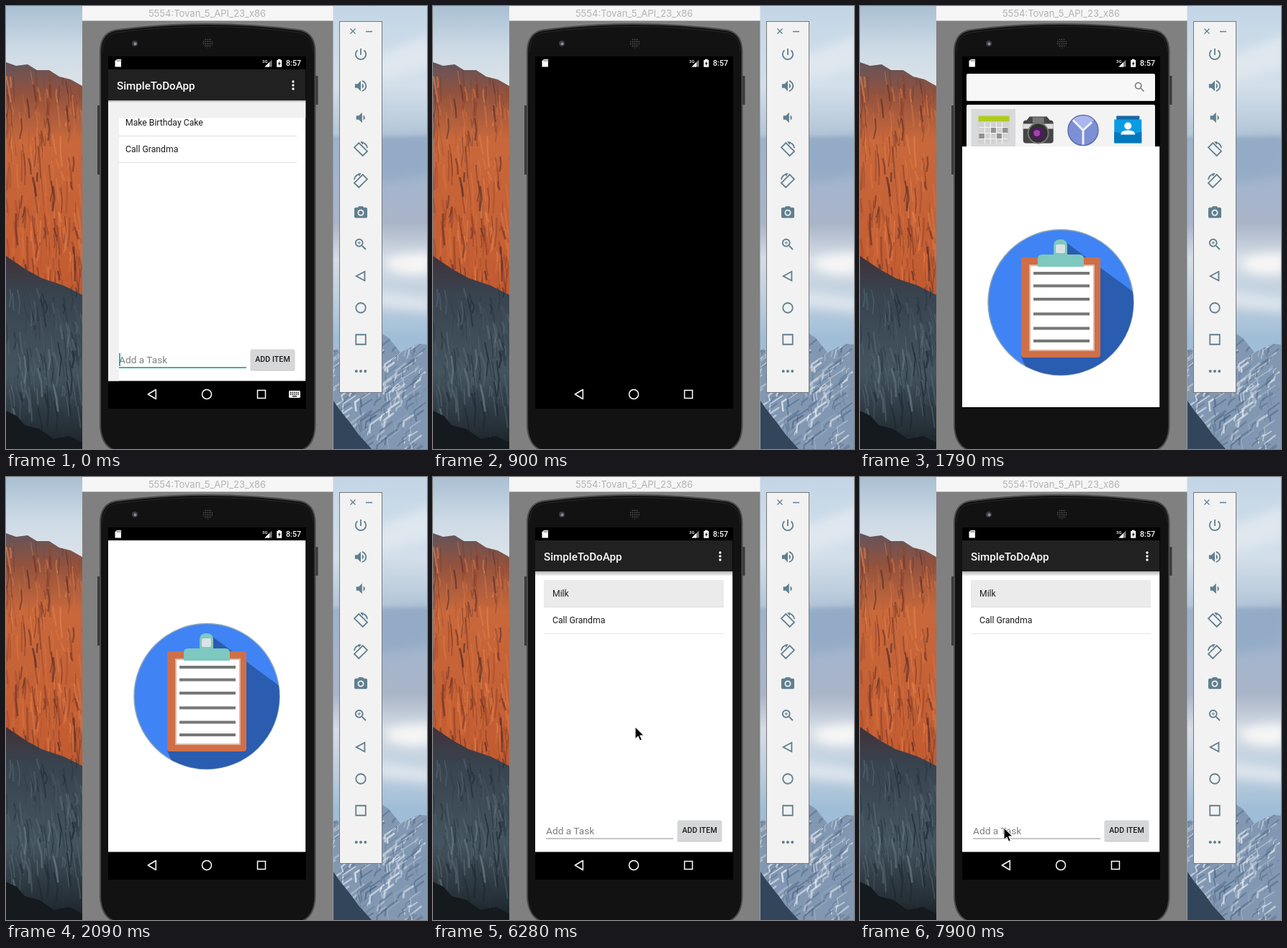
Recreate the animation shown at these times as an HTML page. Size 585 by 615 pixels, loop 8 s.

```html
<!DOCTYPE html>
<html lang="en">
<head>
<meta charset="utf-8">
<title>To-do app in the emulator</title>
<style>
html, body { margin: 0; width: 100%; height: 100%; overflow: hidden; background: #808080; }
svg { display: block; }
text { font-family: Roboto, sans-serif; }
.medium { font-weight: 500; }
.line { fill: none; }
</style>
</head>
<body>
<svg width="585" height="615" viewBox="0 0 585 615">
  <defs>
    <linearGradient id="sky" x2="0" y2="1">
      <stop offset="0" stop-color="#c3d6e6"/><stop offset=".18" stop-color="#d3dfea"/>
      <stop offset=".29" stop-color="#b3c6d8"/><stop offset=".3" stop-color="#9db2ca"/>
      <stop offset=".4" stop-color="#a4b5cd"/><stop offset=".49" stop-color="#a9b4c8"/>
      <stop offset=".57" stop-color="#d5dde6"/><stop offset=".67" stop-color="#bccddd"/>
      <stop offset=".75" stop-color="#9fbdd7"/>
    </linearGradient>
    <linearGradient id="leftSky" x2="0" y2="1">
      <stop offset="0" stop-color="#a9bfd3"/><stop offset=".5" stop-color="#cddae5"/><stop offset="1" stop-color="#dfe5ea"/>
    </linearGradient>
    <linearGradient id="cliff" x2="0" y2="1">
      <stop offset="0" stop-color="#62545a"/><stop offset=".08" stop-color="#92523e"/>
      <stop offset=".2" stop-color="#c8683b"/><stop offset=".6" stop-color="#c25a30"/><stop offset="1" stop-color="#8d3d29"/>
    </linearGradient>
    <linearGradient id="shade" x2="0" y2="1">
      <stop offset="0" stop-color="#40323a"/><stop offset=".2" stop-color="#38444f"/>
      <stop offset=".6" stop-color="#44545f"/><stop offset="1" stop-color="#1a2228"/>
    </linearGradient>
    <linearGradient id="barShadow" x2="0" y2="1">
      <stop offset="0" stop-opacity=".3"/><stop offset="1" stop-opacity="0"/>
    </linearGradient>
    <filter id="soft"><feGaussianBlur stdDeviation="7"/></filter>
    <filter id="blur"><feGaussianBlur stdDeviation=".7"/></filter>
    <pattern id="mesh" width="3" height="3" patternUnits="userSpaceOnUse">
      <rect width="3" height="3" fill="#161616"/><circle cx="1.5" cy="1.5" r=".8" fill="#5a5a5a"/>
    </pattern>
    <clipPath id="screen"><path d="M142 88h274.5v469H142z"/></clipPath>
    <clipPath id="disc"><circle cx="279" cy="304.5" r="101"/></clipPath>
    <clipPath id="rock"><path id="rockShape" d="M0 78l14 5 16-2 13 8 17 0 14 9 16 4 16 9V615H0z"/></clipPath>
    <clipPath id="snow"><path id="snowShape" d="M455 478l20-8 30-12 18-3 9 6 16 20 14-7 12-5 11 1V615H455z"/></clipPath>
    <g id="badge">
      <circle cx="279" cy="304.5" r="101" fill="#4083f4" stroke="#8da7b5" stroke-width="1.5"/>
      <path d="M286 221L400 305V420H240L224 379z" fill="#2a5caf" clip-path="url(#disc)"/>
      <rect x="224" y="242" width="110" height="139" rx="4" fill="#cf6f48"/>
      <rect x="236" y="253" width="89" height="118" fill="#fff" stroke="#e3b5a2" stroke-width="2"/>
      <path d="M241 264h78M241 281.5h78M241 300h78M241 320.5h78M241 340.5h78M241 358h78" stroke="#777" stroke-width="4" filter="url(#blur)"/>
      <path d="M247 255v-11q0-6 6-6h16v-12q0-9 9.500-9t9.500 9v12h17q6 0 6 6v11z" fill="#7ec8bf"/>
      <rect x="272" y="224" width="13" height="12" rx="2" fill="#d9e2e4"/>
    </g>
  </defs>

  <!-- Wallpaper -->
  <path d="M0 0h585v615H0z" fill="url(#sky)"/>
  <path d="M0 0h106v120H0z" fill="url(#leftSky)"/>
  <g filter="url(#soft)">
    <path d="M515 70l75-30v45l-75 20z" fill="#e4ebf1" opacity=".8"/>
    <path d="M515 185l75-6v55l-75 12z" fill="#8ba5c4" opacity=".6"/>
    <path d="M530 352q25-10 60-8v26q-30 8-60-6z" fill="#f6f6f5"/>
    <path d="M515 395l75 10v20l-75-8z" fill="#dde5ed"/>
  </g>
  <use href="#rockShape" fill="url(#cliff)"/>
  <g id="cliffStreaks" clip-path="url(#rock)"></g>
  <path d="M0 347L28 366 50 378 80 388 106 401V615H0z" fill="url(#shade)"/>
  <g id="shadeStreaks"></g>
  <path d="M0 562l15 7 11 13 20 5 20 14 22-4 18 9v9H0z" fill="#141a1d"/>
  <use href="#snowShape" fill="#8298b2"/>
  <g id="snowStreaks" clip-path="url(#snow)"></g>
  <path d="M455 548l9 13 16 20 10 14 18 20h-53z" fill="#33455a"/>

  <!-- Emulator window -->
  <path d="M106 20h348.500v595H106z" fill="#808080"/>
  <path d="M106 0h348.500v20.500H106z" fill="#f6f6f6"/>
  <text x="279.500" y="15" text-anchor="middle" font-size="13" fill="#b3b3b3" style="font-family:Inter,sans-serif">5554:Tovan_5_API_23_x86</text>
  <path d="M127 138h4v96h-4zM430 97h3.500v40H430z" fill="#3a3a3a"/>
  <path d="M131 64Q131 38 152 33.500Q280 16.500 409 33.500Q429.500 38 429.500 64V582Q429 612 407 618H154Q132 612 131 582z" fill="#121212" stroke="#4a4a4a" stroke-width="2"/>
  <path d="M134 64Q134 41 153 37Q280 20 408 37Q427 41 427 64" class="line" stroke="#252525"/>
  <circle cx="179" cy="52" r="4" fill="#3c3c42"/><circle cx="179.500" cy="52.500" r="2" fill="#8b8b99"/>
  <circle cx="280.500" cy="51.500" r="7" fill="url(#mesh)"/>
  <path d="M142 70h275v489H142z"/>

  <!-- Status bar -->
  <g fill="#fff">
    <path d="M154 74h6v10.500h-8.500V76.500z"/><path d="M154.500 75v2M156.500 75v2M158.500 75v2" stroke="#000" stroke-width=".7"/>
    <text x="356" y="79" font-size="6" class="medium">3G</text>
    <path d="M369.500 74.500v10h-10z" opacity=".5"/><path d="M366 78v6.500h-6.500z"/>
    <path d="M378 75v-1.200h3.500V75h1.700v9.700h-7V75z"/><path d="M380.500 76l-2.500 4.500h1.500l-.5 3 2.700-4.500h-1.700z" fill="#000"/>
    <text x="389" y="83.300" font-size="10.700" class="medium">8:57</text>
  </g>

  <!-- Launcher -->
  <g id="launcher">
    <rect x="148" y="94" width="262" height="38" rx="2" fill="#f7f7f7"/>
    <path d="M149 131.500h260" stroke="#ccc"/>
    <rect x="148" y="137" width="262" height="378" rx="2" fill="#f3f3f3"/>
    <path d="M154.500 143h61.500v74h-61.500z" fill="#d7d9da"/>
    <path d="M407 440h3v48h-3z" fill="#aaa"/>
    <g id="apps"></g>
  </g>

  <g clip-path="url(#screen)">
    <g id="splash"><path d="M142 88h274.500v432.500H142z" fill="#fff"/><use href="#badge"/></g>
    <g id="app">
      <path d="M142 131h274.500v389.500H142z" fill="#fff"/>
      <g id="before">
        <path d="M142 131h274.500v24.500H157v365h-15z" fill="#f1f1f1"/>
        <path d="M157 180.500h247" stroke="#ddd"/>
        <text x="166" y="165.800" font-size="12.200" fill="#1c1c1c">Make Birthday Cake</text>
        <path d="M142 131h274.500v3H142z" fill="url(#barShadow)"/>
      </g>
      <g id="after">
        <path d="M142 131h274.500v7H142z" fill="url(#barShadow)"/>
        <path id="row" d="M154 143h250v37.500H154z"/>
        <path d="M154 180.500h250" stroke="#dcdcdc"/>
        <text x="166" y="165.800" font-size="12.200" fill="#1c1c1c">Milk</text>
      </g>
      <path d="M142 85h274.500v46H142z" fill="#212121"/>
      <text x="154" y="115.800" font-size="15.200" class="medium" fill="#fff">SimpleToDoApp</text>
      <g fill="#fff"><circle cx="399" cy="105" r="1.700"/><circle cx="399" cy="110" r="1.700"/><circle cx="399" cy="115" r="1.700"/></g>
      <text x="166" y="203.200" font-size="12.200" fill="#1c1c1c">Call Grandma</text>
      <path id="rowLine" d="M154 217.500h250"/>
      <text x="157" y="496.200" font-size="13.700" fill="#7f7f7f">Add a Task</text>
      <path id="underline" d="M157 502h177"/>
      <path id="caret" d="M158 482v18" stroke="#009688" stroke-width="1.500"/>
      <rect x="339.500" y="477.500" width="62" height="29" rx="2" fill="#000" opacity=".2"/>
      <rect x="340" y="476.500" width="61" height="28.500" rx="1.500" fill="#d6d7d9"/>
      <text x="370.500" y="494.300" font-size="10.700" text-anchor="middle" class="medium" fill="#1c1c1c">ADD ITEM</text>
    </g>
  </g>

  <!-- Navigation bar -->
  <g class="line" stroke="#fff" stroke-width="1.500">
    <path d="M208.300 532.500v13l-11-6.500z" stroke-linejoin="round"/>
    <circle cx="279" cy="539" r="6.500"/><path d="M349.500 533.500h11v11h-11z"/>
  </g>
  <g id="keyboard">
    <rect x="393" y="534" width="16" height="10" rx="1.500" fill="#eee"/>
    <path d="M395 536.500h12M395 539h12" stroke="#000" stroke-width="1.300" stroke-dasharray="1.300 1.300"/><path d="M398 541.800h6" stroke="#000" stroke-width="1.200"/>
  </g>

  <!-- Emulator controls -->
  <rect x="463.500" y="21.500" width="59" height="515" fill="#f2f2f2" stroke="#77777a"/>
  <path d="M478.500 31.500l7 7m0-7l-7 7M500 35.500h9" stroke="#5f7f8f" stroke-width="1.300"/>
  <g id="controls"></g>

  <path id="cursor" d="M0 0v16.500l4-3.600 2.600 6 2.700-1.200-2.600-5.800h5.300z" stroke="#fff" stroke-width="1"/>
</svg>
<script>
const $ = id => document.getElementById(id);
const show = (id, on) => $(id).style.display = on ? '' : 'none';

let seed = 7;
const random = (lo, hi) => {
  seed = (seed * 16807) % 2147483647;
  return lo + (hi - lo) * seed / 2147483647;
};

// Short jagged strokes that suggest rock and snow
function streaks(id, count, box, colours, lean, length) {
  let out = '';
  for (let i = 0; i < count; i++) {
    const x = random(box[0], box[2]), y = random(box[1], box[3]), h = random(length / 4, length);
    out += `<path d="M${x} ${y}l${h * lean + random(-2, 2)} ${h / 2} ${random(-3, 3)} ${h / 2}" fill="none" ` +
      `stroke="${colours[i % colours.length]}" stroke-width="${random(.6, 3)}" opacity="${random(.2, .65)}"/>`;
  }
  $(id).innerHTML = out;
}
streaks('cliffStreaks', 240, [0, 85, 106, 380], ['#6a3026', '#e88750', '#91422a', '#db733e', '#46282a'], .04, 48);
streaks('shadeStreaks', 130, [0, 390, 104, 560], ['#1b252e', '#6d7e8a', '#27343f', '#586975'], .1, 50);
streaks('snowStreaks', 190, [455, 460, 585, 615], ['#fff', '#50698a', '#e6edf5', '#3f5674'], -.7, 28);

// App icons, each drawn around its own centre
const gear = (body, rim, core) =>
  `<circle r="16" fill="none" stroke="${body}" stroke-width="9" stroke-dasharray="7.500 5.066"/>
   <circle r="12" fill="none" stroke="${body}" stroke-width="9"/><circle r="8" fill="${core}" stroke="${rim}" stroke-width="3"/>`;
const tools = gear('#c9c9c9', '#e8894e', '#f7f7f7') + '<path d="M8 8l9 10M-12-12l-4 3" stroke="#999" stroke-width="2"/><path d="M-3-4l7 4-7 4z" fill="#999"/>';
const grid = '<path d="M-20-4h40M-20 4h40M-20 12h40M-12-11v30M-4-11v30M4-11v30M12-11v30" stroke="#f5f5f5"/>';
const apps = [
  ['Calendar', '<path d="M-21-20h43v8h-43z" fill="#b0cb1f"/><path d="M-21-12h43v28h-14l-4 3h-25z" fill="#d2d2d2"/><path d="M-4-4h8v8h-8zM4 4h8v8H4zM-20 4h8v8h-8zM12-4h8v8h-8z" fill="#929292"/>' + grid],
  ['Camera', '<path d="M-21-10q0-4 5-4l4-5h24l4 5q5 0 5 4v24q0 4-4 4h-34q-4 0-4-4z" fill="#454545"/><path d="M-21-9h42v7h-42z" fill="#ddd"/><path d="M-8-18H8v8H-8z" fill="#777"/><circle cy="4" r="14" fill="#303030" stroke="#777" stroke-width="2"/><circle cy="4" r="9" fill="#4a1d58"/><circle cx="-2" cy="4" r="4.500" fill="#a543a5"/>'],
  ['Clock', '<circle r="21" fill="#7d8fd5" stroke="#5e6fae" stroke-width="1.500"/><path d="M0 0L-15-14A21 21 0 0 1 15-14z" fill="#aab7ed"/><path d="M0 20V0L-14-14M0 0l12-11" fill="none" stroke="#eef1ff" stroke-width="3"/>'],
  ['Contacts', '<path d="M-16-20h32v6h-32z" fill="#1769a6"/><path d="M-19-15h38v32h-38z" fill="#0b9be3"/><path d="M-19 2l19 5 19-5v16h-38z" fill="#0277bd"/><circle cy="-6" r="5" fill="#fff"/><path d="M-10 6q0-6 10-6t10 6z" fill="#fff"/>'],
  ['Custom Locale', tools],
  ['Dev Settings', '<rect x="-21" y="-21" width="42" height="42" rx="2" fill="#37474f"/><path d="M-16-11h32M-16 1h32M-16 13h32" stroke="#71828b" stroke-width="2"/><path d="M-16-11H6M-16 1H-4M-16 13H2" stroke="#2e9cdc" stroke-width="2"/><g fill="#39a9ea"><circle cx="8" cy="-11" r="4"/><circle cx="-4" cy="1" r="4"/><circle cx="4" cy="13" r="4"/></g>'],
  ['Dev Tools', tools],
  ['Downloads', '<circle r="21" fill="#03a2ee"/><path d="M-4-13h8v10h7L0 8-11-3h7zM-11 10h22v3h-22z" fill="#fff"/>'],
  ['Email', '<path d="M-21-3L0-19 21-3v23h-42z" fill="#d5d5d5"/><path d="M-15-20h30V9h-30z" fill="#fafafa"/><text y="-2" text-anchor="middle" font-size="17" fill="#777">@</text><path d="M-21-2L0 11 21-2v22h-42z" fill="#ebe9e7"/><path d="M-21 20L0 8l21 12z" fill="#ef9a68"/>'],
  ['Gallery', '<path d="M-20-20h40v40h-40z" fill="#353535" stroke="#777" stroke-width="1.500"/><path d="M-14-14h28v28h-28z" fill="#b23e25"/><path d="M-14 8a14 17 0 0 1 28 0z" fill="#f1a13d"/><path d="M-10 10a10 12 0 0 1 20 0z" fill="#fae7b5"/><path d="M-14 8l10-3 18 5v4h-28z" fill="#47251f"/>'],
  ['Gestures Build..', '<path d="M-19-8l31-10 8 25-31 11z" fill="#f7f7f7" stroke="#aaa"/><path d="M-19-14l33-6 2 8-34 8z" fill="#606060"/><path d="M-10 12Q5-12 8-3T-2 4Q-3 0 14 8" fill="none" stroke="#5b0b31" stroke-width="2.500"/><circle cx="14" cy="8" r="2" fill="#e44"/>'],
  ['Messaging', '<path d="M-7-18h29v25l-5-5h-24z" fill="#d8d8d8"/><path d="M-21-9h34v27h-26l-8 6z" fill="#8bc34a"/><g fill="#fff"><circle cx="-10" cy="-1" r="2.500"/><circle cx="2" cy="-1" r="2.500"/><path d="M-13 5H5q-2 8-9 8t-9-8z"/></g>'],
  ['Music', '<circle r="20" fill="#272d34" stroke="#777"/><circle r="14" fill="#111820" stroke="#45515d" stroke-width="2"/><circle r="8" fill="#386ba4"/><circle r="4" fill="#9dccf5"/>'],
  ['Nanochat', '<circle r="20" fill="#8bc34a"/>'],
  ['Phone', '<path d="M-21-14q3-7 10-7l6 8-5 7Q-6 5 6 9l6-5 9 6q-1 8-8 10Q-19 18-21-14z" fill="#159bdd" stroke="#0879b9"/><path d="M-17-14Q-13 10 10 16" fill="none" stroke="#61c9f4" stroke-width="3"/>'],
  ['Search', '<path d="M5 5l13 14" stroke="#a65b28" stroke-width="7" stroke-linecap="round"/><circle cx="-4" cy="-7" r="13" fill="#c3e2f2" stroke="#888" stroke-width="3"/><path d="M-12-9q2-8 10-7" fill="none" stroke="#fff" stroke-width="4"/>'],
  ['Settings', gear('#5c7480', '#9bb1ba', '#3d555f') + '<circle r="5" fill="#80cbc4"/>'],
  ['SimpleToDoApp', '<use href="#badge" transform="scale(.19) translate(-279 -304.500)"/>'],
  ['Sunshine', '<path d="M-19-18h38v5h-38z" fill="#ddd"/><path d="M-17-13h34v23h-34z" fill="#eee" stroke="#ddd"/><path d="M-19 10h38v4h-38z" fill="#ef9565"/><circle cy="-1" r="7" fill="none" stroke="#bbb" stroke-width="6" stroke-dasharray="2 2"/><circle cy="-1" r="5" fill="#fff" stroke="#bbb"/><path d="M-8 14l-5 8M8 14l5 8" stroke="#999" stroke-width="2"/>'],
  ['Widget Preview', '<path d="M-18-10l32-6 5 22-32 8z" fill="#fff" stroke="#ccc"/><path d="M-18-10l32-6 1 4-32 7z" fill="#78a7e5"/><path d="M0-4v8M-4 0h8" stroke="#222" stroke-width="1.500"/><path d="M-19-12v-7h7M12-19h7v7M19 12v7h-7M-12 19h-7v-7" fill="none" stroke="#444" stroke-width="2"/>'],
];
const lens = 'M15.500 14h-.79l-.28-.27C15.410 12.590 16 11.110 16 9.500 16 5.910 13.090 3 9.500 3S3 5.910 3 9.500 5.910 16 9.500 16c1.610 0 3.090-.59 4.230-1.570l.27.28v.79l5 4.990L20.490 19l-4.990-5zm-6 0C7.010 14 5 11.990 5 9.500S7.010 5 9.500 5 14 7.010 14 9.500 11.990 14 9.500 14z';
$('apps').innerHTML = apps.map(([name, art], i) =>
  `<g transform="translate(${185.4 + i % 4 * 62.3} ${172.5 + Math.floor(i / 4) * 74.3})">${art}
   <text y="36" text-anchor="middle" font-size="9.500" letter-spacing="-.35" fill="#5a5a5a">${name}</text></g>`).join('') +
  `<path d="${lens}" fill="#777" transform="translate(379.500 103.500) scale(.76)"/>`;

// Side buttons on a 24-unit grid
const stroked = d => `<path d="${d}" fill="none" stroke="#5f7f8f" stroke-width="2"/>`;
const filled = d => `<path d="${d}" fill-rule="evenodd"/>`;
const rotate = stroked('M2 9L9 2 22 15 15 22z') + stroked('M13 1.500Q21 2 22 10') + filled('M11 0l5 0-1 5z');
const controls = [
  filled('M13 3h-2v10h2zm4.830 2.170l-1.420 1.420A7 7 0 1 1 7.580 6.580L6.170 5.170A9 9 0 1 0 17.830 5.170z'),
  filled('M3 9v6h4l5 5V4L7 9zm13.500 3A4.500 4.500 0 0 0 14 8v8a4.500 4.500 0 0 0 2.500-4zM14 3.200v2.100a7 7 0 0 1 0 13.400v2.100a9 9 0 0 0 0-17.600z'),
  filled('M18.500 12A4.500 4.500 0 0 0 16 8v8a4.500 4.500 0 0 0 2.500-4zM5 9v6h4l5 5V4L9 9z'),
  rotate,
  `<g transform="matrix(-1 0 0 1 24 0)">${rotate}</g>`,
  filled('M9 2L7.200 4H4q-2 0-2 2v12q0 2 2 2h16q2 0 2-2V6q0-2-2-2h-3.200L15 2zM12 7a5 5 0 1 1 0 10 5 5 0 0 1 0-10z') + '<circle cx="12" cy="12" r="3"/>',
  filled(lens) + filled('M12 10h-2v2H9v-2H7V9h2V7h1v2h2z'),
  stroked('M18 5v14L5 12z'),
  '<circle cx="12" cy="12" r="7.500" fill="none" stroke="#5f7f8f" stroke-width="2"/>',
  stroked('M4.500 4.500h15v15h-15z'),
  '<circle cx="5" cy="12" r="2.200"/><circle cx="12" cy="12" r="2.200"/><circle cx="19" cy="12" r="2.200"/>',
];
$('controls').innerHTML = controls.map((art, i) =>
  `<g fill="#5f7f8f" transform="translate(482.200 ${56.2 + i * 44}) scale(.9)">${art}</g>`).join('');

// Pointer stops: time, x, y
const stops = [
  [6280, 281, 347], [6430, 234, 284], [6570, 226, 260], [6720, 202, 208],
  [6870, 203, 207], [7020, 196, 205], [7170, 195, 205], [7310, 196, 207],
  [7460, 214, 316], [7610, 245, 468], [7760, 237, 469], [7900, 200, 487],
];

function paint(element, attributes) {
  for (const name in attributes) $(element).setAttribute(name, attributes[name]);
}

function draw(t) {
  const first = t < 450, settling = t >= 4940 && t < 5080;
  show('keyboard', t < 900);
  show('launcher', t >= 1200 && t < 1940);
  show('splash', t >= 1790 && t < 4940);
  show('app', first || t >= 4940);
  show('before', first);
  show('after', !first);
  show('caret', first);
  paint('splash', { transform: `translate(0 ${t < 1940 ? 107 : t < 2090 ? 3 : 0})` });
  paint('app', { transform: `translate(0 ${settling ? 2 : 0})` });
  paint('row', { fill: settling ? '#f2f2f2' : '#ebebeb' });
  paint('rowLine', { stroke: settling ? '#ccc' : '#e3e3e3' });
  paint('underline', { stroke: first ? '#009688' : '#8c8c8c', 'stroke-width': first ? 1.6 : 1 });
  const stop = stops.filter(s => s[0] <= t).pop();
  show('cursor', stop);
  if (stop) paint('cursor', { transform: `translate(${stop[1]} ${stop[2]})` });
}

const start = performance.now();
function tick() {
  draw((performance.now() - start) % 8000);
  requestAnimationFrame(tick);
}
draw(0);
tick();
</script>
</body>
</html>
```
